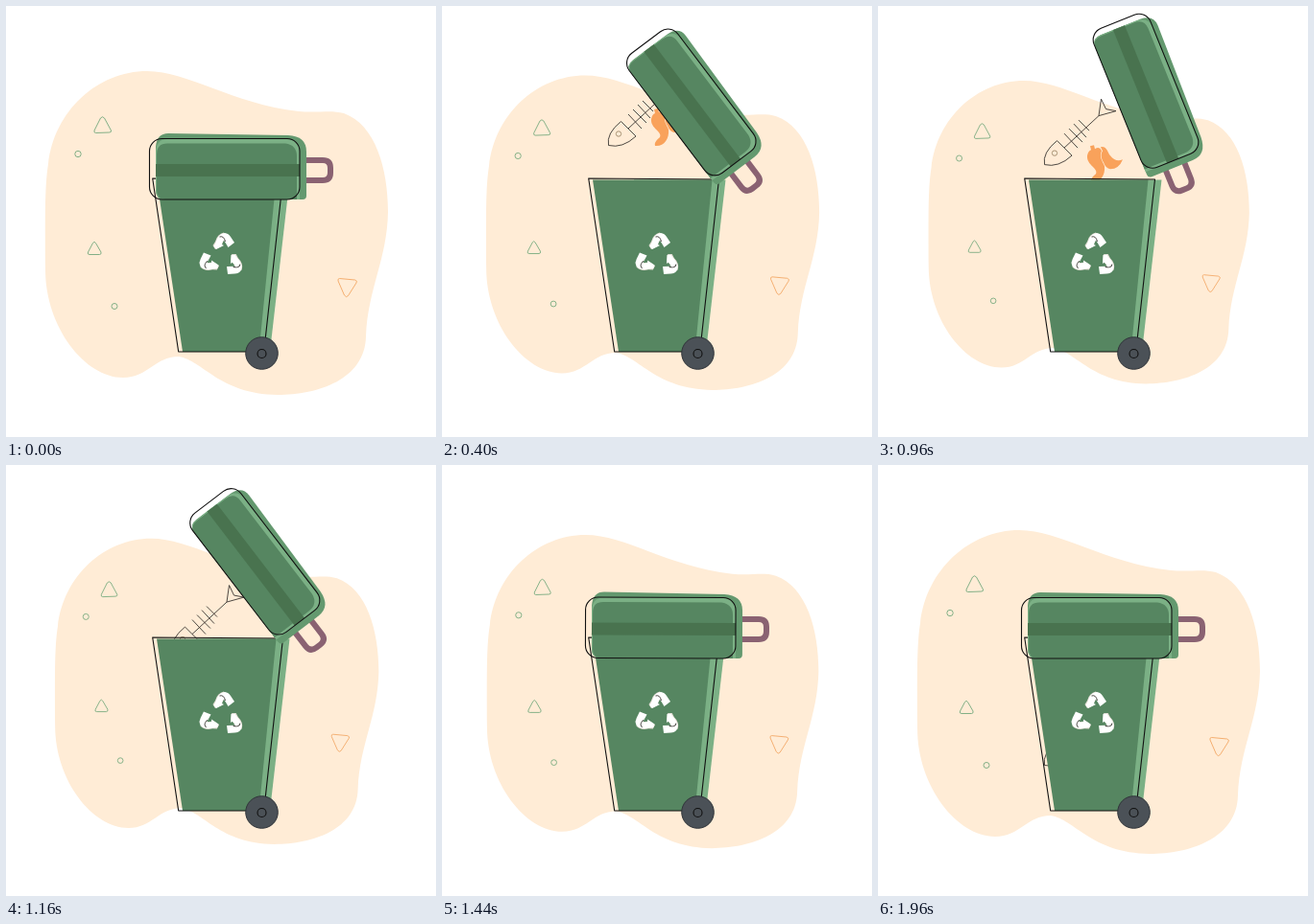
Animation, 448 px wide and 450 px high, one loop 2 s. Source, as an HTML page:

```html
<!DOCTYPE html>
<html lang="en">
<head>
<meta charset="utf-8">
<title>Recycling bin</title>
<style>
  html, body { margin: 0; width: 100%; height: 100%; overflow: hidden; background: #fff; }
  svg { display: block; width: 448px; height: 450px; }
  .line { fill: none; stroke: #111; stroke-width: 1.1; stroke-linejoin: round; }
  .thin { fill: none; stroke: #3a3632; stroke-width: .9; stroke-linejoin: round; }
  .leaf { fill: none; stroke: #74a97d; stroke-width: .9; stroke-linejoin: round; }
  .main { fill: #568661; }
  .light { fill: #7bb085; }
</style>
</head>
<body>
<svg viewBox="0 0 448 450">
  <defs>
    <g id="arrow">
      <path fill="#e4dfd6" d="M215.500 250L218 246Q220 238 227 236.500L229 240 224 251 218 254Z"/>
      <path fill="#fff" d="M216.500 251L218.500 247Q221 238 228 237Q232 237.500 234 241L238 247 231.500 252 227 244.500Q225 246 225 249L227 250 219 254Z"/>
      <path class="thin" d="M222.500 241Q227 239.500 228.500 246"/>
    </g>
  </defs>

  <g id="scene">
    <path fill="#ffecd6" d="M147 68C190 68 235 102 305 110C325 112 338 108 352 112C385 124 398 170 398 215C397 265 377 295 375 345C374 390 325 406 283 406C222 405 205 370 180 366C155 366 148 388 122 388C82 388 41 335 41 275C41 225 40 190 44 165C50 110 95 68 147 68Z"/>
    <g class="leaf" transform="translate(-.5 0)">
      <path d="M99 117Q101 114.500 103 117L110 130Q110.500 132 108 132L94 132.500Q92 132.500 92.500 130Z"/>
      <path d="M91 247.500Q92.500 245 94 247.500L99.500 257Q100 259.500 98 259.500H87.500Q85 259.500 86 257Z"/>
      <circle cx="75.500" cy="154.500" r="3.200"/>
      <circle cx="113.500" cy="313.500" r="3"/>
      <path stroke="#f3a765" d="M348 284.500L364 286Q367 287 365.500 289L357 302.500Q355 305 353 302L346.500 287Q346 284.500 348 284.500Z"/>
    </g>
  </g>

  <g id="fish" class="thin">
    <path d="M186.500 120.500Q171 133 173.500 145.500Q188 149 202 136ZM194 128L230 94.500"/>
    <path d="M230 94.500L232.500 77 237.500 87.500 248 89.500Z"/>
    <path d="M194 113l14 15M199 108l14 14M204 103l13 14M209 99l11 11"/>
    <circle cx="184" cy="133.500" r="2.700" stroke="#a08c6c"/>
  </g>
  <g id="pepper" fill="#f9a25b">
    <path d="M221 108L225 107 226 111Q231 108 233 113C230 119 234 124 236 129C237 139 231 147 222 146C221 142 224 140 227 137C230 131 217 128 218 118Q219 113 222 112Z"/>
    <path d="M232 109C239 108 239 115 242 118C246 123 250 124 255 122Q251 132 242 132Q237 131 235 125C232 120 232 116 234 113Z"/>
  </g>

  <path class="light" d="M200 181.500H295.500L275 361H200Z"/>
  <path class="main" d="M157 181.500H281.500L263.500 361H184Z"/>
  <path class="line" d="M152.700 180L288.500 181L268.700 361H179.700Z"/>
  <use href="#arrow"/>
  <use href="#arrow" transform="rotate(120 225 261.500)"/>
  <use href="#arrow" transform="rotate(240 225 261.500)"/>
  <circle cx="266.500" cy="362.500" r="16.800" fill="#4b5157" stroke="#30353a"/>
  <circle class="line" cx="266.500" cy="363" r="4.500"/>

  <g id="lid">
    <path fill="none" stroke="#8a6272" stroke-width="6" d="M311 161H330Q338 161 338 169V174Q338 182 330 182H311"/>
    <path fill="#64996f" d="M156 147Q157 133 169 133L294 135Q313 136 313 152V198Q313 202 309 202H165Q156 202 156 192Z"/>
    <path class="light" d="M156 154Q156 139 168 139H293Q306 139 306 153V202H165Q156 202 156 192Z"/>
    <path class="main" d="M157 155Q157 143.500 168 143.500H291Q303 145 303 157V202H166Q157 202 157 192Z"/>
    <path fill="#49734f" d="M156 165H306V178H156Z"/>
    <rect class="line" x="149.500" y="138.500" width="156.500" height="63.500" rx="13"/>
  </g>
</svg>
<script>
  const LOOP = 2000;
  const el = id => document.getElementById(id);
  const scene = el('scene'), fish = el('fish'), pepper = el('pepper'), lid = el('lid');

  // Smooth 0..1 progress between two times
  const ease = (t, from, to) => {
    const u = Math.min(1, Math.max(0, (t - from) / (to - from)));
    return (1 - Math.cos(Math.PI * u)) / 2;
  };
  const scaleAt = (x, y, s) => `translate(${x} ${y}) scale(${s}) translate(${-x} ${-y})`;

  function place(item, t, drop) {
    const pop = ease(t, 100, 370);
    const fall = Math.min(168, drop * (Math.max(0, t - 600) / 360) ** 2);
    item.setAttribute('visibility', pop > 0 ? 'visible' : 'hidden');
    item.setAttribute('transform', `translate(0 ${fall}) ` + scaleAt(205, 135, pop));
  }

  function draw(now) {
    const t = now % LOOP;
    const shrink = ease(t, 0, 880) - ease(t, 880, LOOP);
    const open = ease(t, 105, 535) - ease(t, 1025, 1455);
    scene.setAttribute('transform', scaleAt(224, 225, 1 - 0.065 * shrink));
    lid.setAttribute('transform', `rotate(${68 * open} 313.8 167.5)`);
    place(fish, t, 20);
    place(pepper, t, 38);
  }

  const start = performance.now();
  function tick() {
    draw(performance.now() - start);
    requestAnimationFrame(tick);
  }
  tick();
</script>
</body>
</html>
```
